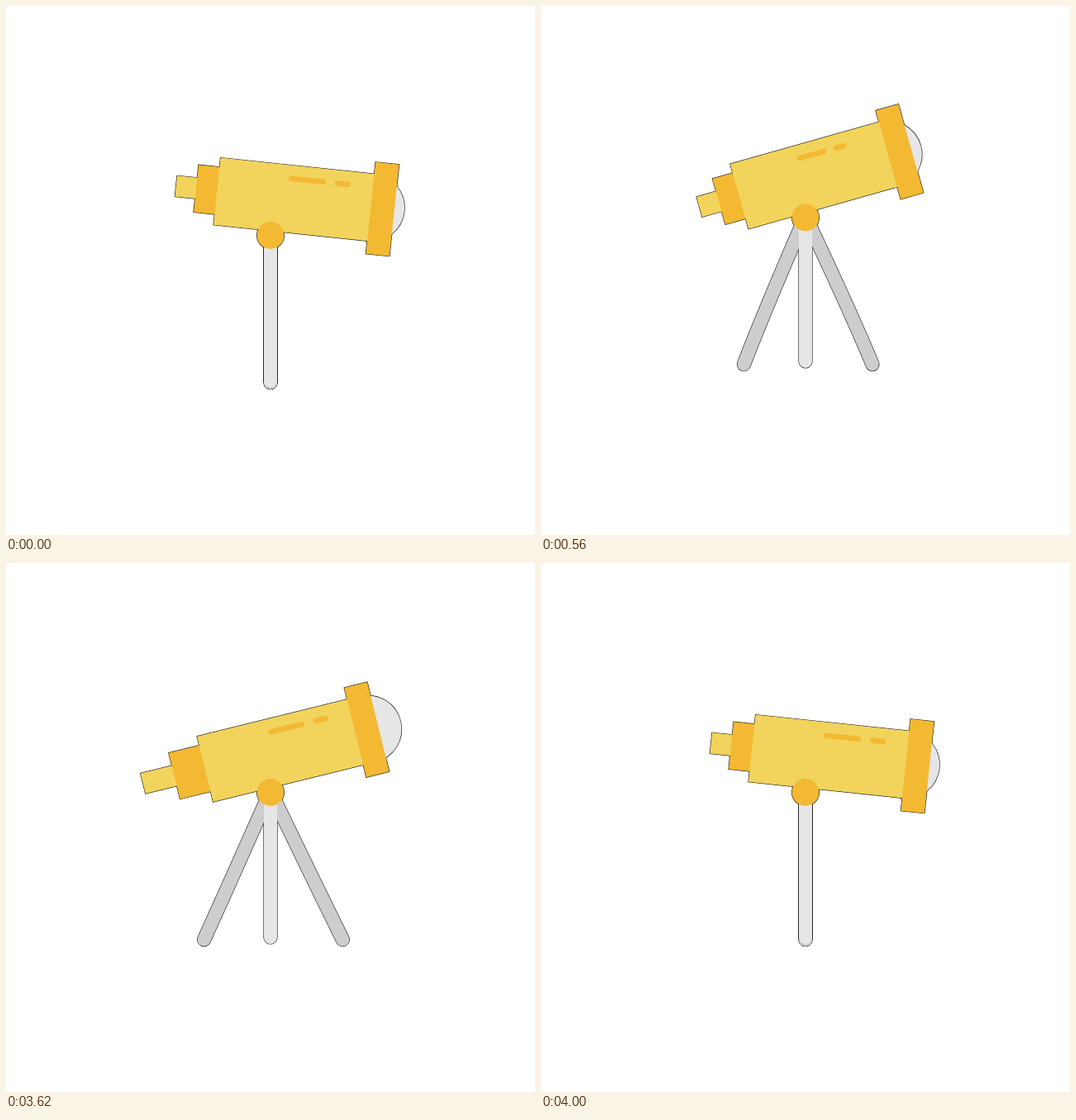
An HTML page with a canvas for the animation above (4840 ms loop, 640 by 640 pixels).

```html
<!DOCTYPE html>
<html lang="en">
<head>
<meta charset="utf-8">
<title>Telescope</title>
<style>
  html, body { margin: 0; width: 100%; height: 100%; overflow: hidden; background: #fff; }
  canvas { display: block; width: 100vmin; height: 100vmin; margin: auto; }
</style>
</head>
<body>
<canvas id="stage" width="640" height="640"></canvas>
<script>
const ctx = document.getElementById('stage').getContext('2d');
const LOOP = 4840, STEP = 20, CLOSE_START = 3600, CLOSE_END = 4000;
const YELLOW = '#f2d45c', ORANGE = '#f3b933', LIGHT = '#e6e6e6', GREY = '#cdcdcd', LINE = '#1c1c1c';
const OUTLINE = 1.2;

const clamp = v => Math.max(0, Math.min(1, v));
const mix = (a, b, p) => a + (b - a) * p;
const hump = p => Math.sin(Math.PI * p);

function ease(t, from, to) {
  const p = clamp((t - from) / (to - from));
  return p * p * (3 - 2 * p);
}

// Eased value through [time, value] keys.
function track(t, keys) {
  let value = keys[0][1];
  for (let i = 1; i < keys.length; i++) {
    value += (keys[i][1] - keys[i - 1][1]) * ease(t, keys[i - 1][0], keys[i][0]);
  }
  return value;
}

function poseAt(t) {
  if (t >= CLOSE_START) {
    const p = ease(t, CLOSE_START, CLOSE_END);
    return {
      angle: mix(-14, 6, p), lift: 0, slots: 1, spread: 1 - p,
      bend: -hump(p), drop: 4 * hump(p), tuck: 0,
      lens: 1 - p, eyepiece: 1 - p, collar: 1 - p
    };
  }
  const spread = ease(t, 180, 640);
  return {
    angle: track(t, [[100, 6], [220, 14], [400, -12], [520, -16], [720, -14]]),
    lift: 28 * Math.max(0, 1 - ((t - 440) / 250) ** 2),
    slots: track(t, [[100, 1], [370, 0.64], [760, 1]]),
    spread, bend: hump(spread), drop: -2 * hump(spread), tuck: 6 * hump(spread),
    lens: ease(t, 640, 1180), eyepiece: ease(t, 640, 1180), collar: ease(t, 1160, 1360)
  };
}

// Shapes are laid down twice: dark and slightly larger, then in colour,
// so the outline follows only the outer silhouette.
function drawTelescope(pose, dark) {
  function shape(color, build) {
    ctx.beginPath();
    build();
    ctx.fillStyle = dark ? LINE : color;
    ctx.fill();
    if (dark) {
      ctx.strokeStyle = LINE;
      ctx.lineWidth = OUTLINE;
      ctx.stroke();
    }
  }
  const box = (color, x1, y1, x2, y2) => shape(color, () => ctx.rect(x1, y1, x2 - x1, y2 - y1));
  const disc = (color, x, y, r) => shape(color, () => ctx.arc(x, y, r, 0, 2 * Math.PI));

  function bar(color, width, build) {
    ctx.beginPath();
    build();
    ctx.strokeStyle = dark ? LINE : color;
    ctx.lineWidth = width + (dark ? OUTLINE : 0);
    ctx.stroke();
  }

  function sideLeg(side, reach) {
    const top = side * pose.spread;
    const x = side * reach * pose.spread;
    const y = 177.5 + pose.drop;
    bar(GREY, 16, () => {
      ctx.moveTo(top, 0);
      ctx.quadraticCurveTo(x * 0.65 + side * pose.bend * 10, y * 0.65, x, y);
    });
  }

  ctx.save();
  ctx.translate(320, 278 - pose.lift);
  ctx.lineCap = 'round';
  ctx.lineJoin = 'miter';

  sideLeg(-1, 81);
  sideLeg(1, 88);
  bar(LIGHT, 16, () => {
    ctx.moveTo(0, 0);
    ctx.lineTo(0, 175 - pose.tuck);
  });

  ctx.save();
  ctx.rotate(pose.angle * Math.PI / 180);
  const collarX = -95.5 - 12.7 * pose.collar;
  const eyeX = -120 - 14.6 * pose.eyepiece - 12.7 * pose.collar;
  disc(LIGHT, 117.5 + 15.7 * pose.lens, -46.5, 40.5);
  box(YELLOW, eyeX, -60.5, collarX + 5, -35.2);
  box(ORANGE, collarX, -76.3, -65, -18.8);
  box(YELLOW, -70, -87.6, 120, -6);
  box(ORANGE, 117, -102, 145.7, 9.5);
  if (!dark) {
    const slotX = x => -12 + (x + 12) * pose.slots;
    for (const [from, to] of [[14.7, 59.8], [70.7, 90]]) {
      bar(ORANGE, 6.6, () => {
        ctx.moveTo(slotX(from) + 3.3, -71.5);
        ctx.lineTo(slotX(to) - 3.3, -71.5);
      });
    }
  }
  ctx.restore();

  disc(ORANGE, 0, -0.5, 16.4);
  ctx.restore();
}

const start = performance.now();

function frame() {
  const elapsed = (performance.now() - start) % LOOP;
  const pose = poseAt(Math.floor(elapsed / STEP) * STEP);
  ctx.fillStyle = '#fff';
  ctx.fillRect(0, 0, 640, 640);
  drawTelescope(pose, true);
  drawTelescope(pose, false);
  requestAnimationFrame(frame);
}
frame();
</script>
</body>
</html>
```
